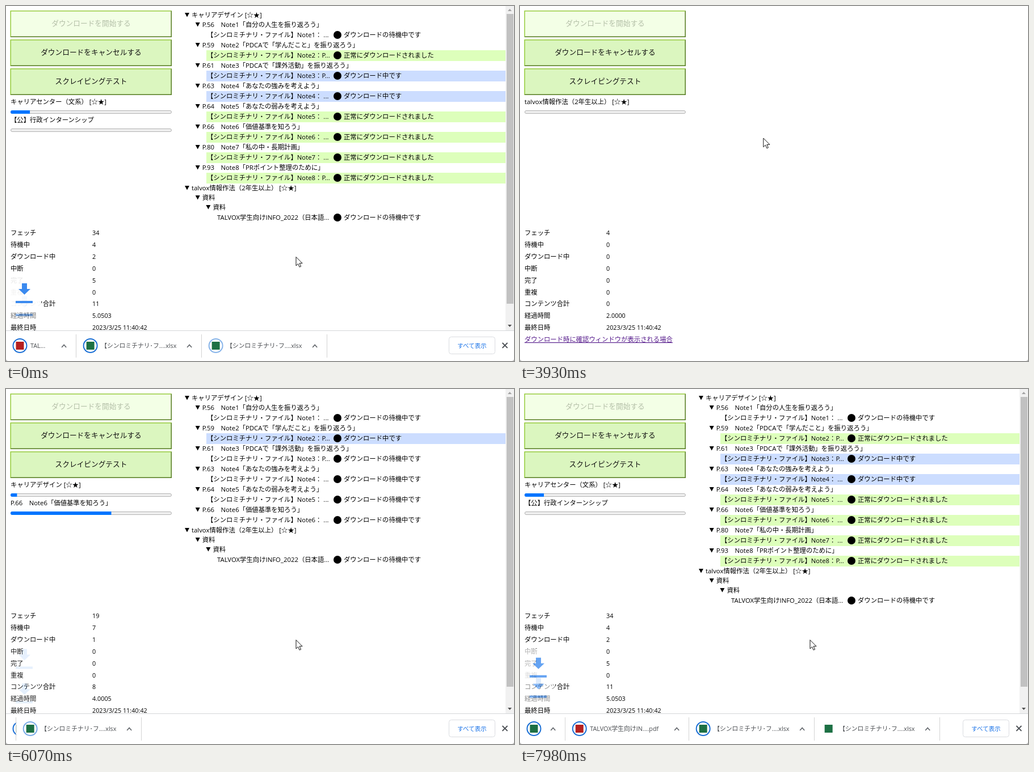
Write an HTML page that moves like this. It is 895x626 px and loops after 8000 ms.

```html
<!DOCTYPE html>
<html lang="ja">
<head>
<meta charset="utf-8">
<title>ダウンロード</title>
<style>
html, body { margin: 0; width: 100%; height: 100%; overflow: hidden; background: #fff; }
svg { display: block; font: 400 11.35px "Open Sans", "Noto Sans CJK JP", "Noto Sans CJK", sans-serif; }
</style>
</head>
<body>
<svg id="stage" width="895" height="626" viewBox="0 0 895 626"></svg>
<script>
const LOOP = 8000, stage = document.getElementById('stage');
const COURSE = 'talvox情報作法（2年生以上） [☆★]', CAREER = 'キャリアデザイン [☆★]';

// page, title, download start, download end
const notes = [
  [56, '自分の人生を振り返ろう'],
  [59, 'PDCAで「学んだこと」を振り返ろう', 5240, 6400],
  [61, 'PDCAで「課外活動」を振り返ろう', 7400],
  [63, 'あなたの強みを考えよう', 7520],
  [64, 'あなたの弱みを考えよう', 6300, 6700],
  [66, '価値基準を知ろう', 6500, 7100],
  [80, '私の中・長期計画', 7000, 7300],
  [93, 'PRポイント整理のために', 7150, 7450]
];
const noteName = i => `P.${notes[i][0]}　Note${i + 1}「${notes[i][1]}」`;
const noteTimes = [4560, 4830, 5200, 5340, 5660, 5930, 6200, 6400];

const courses = [[3510, COURSE, 0], [4480, CAREER, 1 / 25],
  [6500, 'キャリアセンター（理工）全学年対象', 2 / 25], [7150, 'キャリアセンター（文系） [☆★]', 3 / 25]];
const pages = [[4210, '資料', 0],
  ...[4480, 4970, 5500, 5640, 5800, 5980, 6200, 6340].map((t, i) => [t, noteName(i), i / 8]),
  [6500, 'トップページ', 0], [7150, '【公】行政インターンシップ', 0]];

const labels = ['フェッチ', '待機中', 'ダウンロード中', '中断', '完了', '重複', 'コンテンツ合計', '経過時間', '最終日時'];
// time, then one value per label
const counts = ['2430 0 0 0 0 0 0 0 0.0000', '2890 0 0 0 0 0 0 0 1.0000', '3510 2 0 0 0 0 0 0 1.0000',
  '3790 4 0 0 0 0 0 0 2.0000', '4280 6 1 0 0 0 0 1 2.0000', '4560 8 1 0 0 0 0 1 3.0000',
  '4830 10 2 0 0 0 0 2 3.0000', '5340 14 3 0 0 0 0 3 3.0002', '5600 16 5 0 0 0 0 5 3.0003',
  '5860 17 6 0 0 0 0 6 4.0003', '6040 19 7 1 0 0 0 8 4.0005', '6400 21 8 1 0 1 0 10 4.0202',
  '6760 24 7 1 0 2 0 10 4.0501', '7170 28 6 2 0 3 0 11 4.0502', '7500 34 4 2 0 5 0 11 5.0503'
].map(s => s.split(' '));

// shelf items: start, delay before the ring pulses, is PDF
const files = [[5279, 580], [6050, 305], [6340, 280], [6753, 752], [7150, 850], [7540, 900, true], [7880, 900]];
const oldFiles = [[-900, 670], [-500, 900], [-168, 900, true]];
// arrows rising from the shelf; the first leaves from lower down while the shelf opens
const flights = [[5270, 536], ...[5490, 6050, 6340, 6725, 7150, 7540, 7870].map(t => [t, 521.5])];
const oldFlights = [[-300, 521.5], [-90, 521.5]];

const clamp = v => Math.max(0, Math.min(1, v));
const part = (t, a, b) => clamp((t - a) / (b - a));
const mix = (a, b, p) => a + (b - a) * p;
const last = (list, t) => list.filter(e => e[0] <= t).pop();
const rect = (x, y, w, h, fill, more = '') =>
  `<rect x="${x}" y="${y}" width="${w}" height="${h}" fill="${fill}" ${more}/>`;
const path = (d, fill, more = '') => `<path d="${d}" fill="${fill}" ${more}/>`;
const text = (x, mid, s, more = '') => `<text x="${x}" y="${mid + 4}" ${more}>${s}</text>`;

function button(y, label, fill, ink) {
  return rect(7.5, y, 284.5, 47, fill) +
    path(`M7.500 ${y + 47}V${y}H292l-1.500 1.500H9V${y + 45.5}z`, '#98cb40') +
    path(`M7.500 ${y + 47}H292V${y}l-1.500 1.500V${y + 45.5}H9z`, '#557a20') +
    text(150, y + 23, label, `text-anchor="middle" font-size="12.7" fill="${ink}"`);
}

function progress(mid, [, name, value]) {
  const w = 284 * value;
  return text(8, mid, name) +
    rect(8.5, mid + 15.5, 283, 5, '#efefef', 'rx="2.5" stroke="#b2b2b2"') +
    (w ? path(`M${8 + w} ${mid + 15}H11a3 3 0 0 0 0 6H${8 + w}z`, '#0075ff') : '');
}

function panel(t) {
  const off = t >= 1840, hover = t >= 1230;
  let s = button(8, 'ダウンロードを開始する', off ? '#f3ffe6' : hover ? '#d0f2ae' : '#dbf6bf', off ? '#b4bfa8' : '#111') +
    button(59, 'ダウンロードをキャンセルする', '#dbf6bf', '#111') +
    button(110, 'スクレイピングテスト', '#dbf6bf', '#111');
  const course = last(courses, t), page = last(pages, t), row = last(counts, t) || [];
  if (course) s += progress(169, course);
  if (page) s += progress(201, page);
  labels.forEach((name, i) => {
    const y = 400 + 20.9 * i, value = i == 8 ? '2023/3/25 11:40:42' : row[i + 1];
    s += text(8, y, name) + (value ? text(152, y, value, 'font-size="10.8"') : '');
  });
  return s + text(8, 588, 'ダウンロード時に確認ウィンドウが表示される場合', 'fill="#551a8b" text-decoration="underline"');
}

function tree(t, shift) {
  const branch = (level, y, name) => {
    const x = 315 + 18.7 * level;
    return path(`M${x} ${y - 4}h8l-4 7.5z`, '#000') + text(x + 12, y, name);
  };
  const leaf = (x, y, name, state) =>
    (state ? rect(353, y - 9, 527 + shift, 19, state > 1 ? '#dfb' : '#cdf') : '') + text(x, y, name) +
    `<circle cx="${584 + shift}" cy="${y}" r="7"/>` +
    text(595 + shift, y, ['ダウンロードの待機中です', 'ダウンロード中です', '正常にダウンロードされました'][state]);
  if (t < 4280) return '';
  const n = noteTimes.filter(v => v <= t).length;
  let s = n ? branch(0, 16, CAREER) : '';
  for (let i = 0; i < n; i++) {
    const [, , start, end] = notes[i], tail = [1, 2, 7].includes(i) ? 'P...' : ' ...';
    s += branch(1, 33 + 36 * i, noteName(i)) +
      leaf(354, 51 + 36 * i, `【シンロミチナリ・ファイル】Note${i + 1}：${tail}`, (t >= start) + (t >= end));
  }
  const y = n ? 33 + 36 * n : 16;
  return s + branch(0, y, COURSE) + branch(1, y + 17, '資料') + branch(2, y + 34, '資料') +
    leaf(372, y + 52, 'TALVOX学生向けINFO_2022（日本語...', 0);
}

function flight(t, [start, from]) {
  const v = (t - start) / 600, y = from - 65 * v;
  if (v < 0 || v > 1) return '';
  return `<g opacity="${1 - 4 * (v - .5) ** 2}">` + rect(2, y - 16, 60, 62, '#fff', 'rx="8" opacity=".9"') +
    path(`M28 ${y}h9v10h6l-10.500 10l-10.500-10h6z M17 ${y + 31}h30v4h-30z`, '#3b8aef') + '</g>';
}

function fit(name, room) {
  const size = c => c < '\u0100' ? 7 : 10.8;
  if (room > 125) return name;
  let cut = '', w = 9;
  for (const c of name) {
    if ((w += size(c)) > room) break;
    cut += c;
  }
  return cut && cut + '...';
}

function fileItem(x, w, age, delay, pdf) {
  const ring = .5 + .5 * Math.cos(2 * Math.PI * Math.max(0, age - delay) / 950);
  const name = pdf ? 'TALVOX学生向けIN....pdf' : '【シンロミチナリ･フ....xlsx';
  const chevron = w - 22;
  return `<svg x="${x}" y="573" width="${w}" height="53">` +
    `<circle cx="24.500" cy="26" r="12" fill="#fff" stroke="#1a6fd6" stroke-width="2" stroke-opacity="${ring}"/>` +
    rect(17.5, 19, 14, 14, pdf ? '#b5201f' : '#1d7044') +
    text(43, 26, fit(name, w - 88), 'font-size="10.8" fill="#4a4d51"') +
    (w > 45 ? path(`M${chevron - 4} 29l4-4.500l4 4.500`, 'none', 'stroke="#5f6368" stroke-width="1.600"') : '') +
    rect(w - 1, 6, 1, 41, '#ccc') + '</svg>';
}

function shelf(t, list, drop) {
  let s = rect(0, 572, 895, 54, '#fff') + rect(0, 572, 895, 1, '#d4d6d9'), x = 0;
  for (const [start, delay, pdf] of [...list].reverse()) {
    const age = t - start;
    if (age <= 0) continue;
    const w = 221 * (1 - (1 - clamp(age / 500)) ** 2);
    if (x + w > 770) break;
    s += fileItem(x, w, age, delay, pdf);
    x += w;
  }
  s += rect(780.5, 583.5, 81, 30, '#fff', 'rx="4" stroke="#dadce0"') +
    text(821, 599, 'すべて表示', 'text-anchor="middle" font-size="10.5" fill="#1a73e8"') +
    path('M874.500 594l9 9m0-9l-9 9', 'none', 'stroke="#4d5156" stroke-width="1.800"');
  return `<g transform="translate(0 ${drop})">${s}</g>`;
}

const scrollbar = bottom => rect(880, 0, 15, bottom, '#f1f1f1') + rect(882, 14, 12, 511, '#c1c1c1') +
  path('M884 9l3.500-4l3.500 4z', '#a3a3a3') + path(`M884 ${bottom - 10}h7l-3.500 4z`, '#505050');

function cursor(t) {
  let x, y;
  if (t < 3440) {
    const p = part(t, 530, 1300), q = part(t, 1300, 1510), e = p * p * (3 - 2 * p);
    x = mix(mix(820, 238, e), 228, q);
    y = mix(mix(567, 41, e), 27, q);
  } else {
    const rest = 1 - part(t, 3440, 4640);
    x = mix(511, 228, rest ** 2.35);
    y = mix(442, 27, rest ** 1.3);
  }
  const busy = t > 6740 && t < 7050
    ? '<circle cx="525" cy="442" r="5.500" fill="#fff" stroke="#2b90e6" stroke-width="4"/>' : '';
  return busy + path('M0 .5v15.500l3.600-3.400l2.500 5.700l2.500-1.100l-2.500-5.500h5z', '#fff',
    `stroke="#111" transform="translate(${x} ${y})"`);
}

function draw(now) {
  const t = Math.max(0, now - begin) % LOOP, tail = t < 70, T = tail ? LOOP - 1 : t;
  const drop = 54 * (1 - part(T, 5170, 5290)), open = T >= 5170;
  stage.innerHTML = panel(T) + tree(T, open ? 0 : 16) +
    [...(tail ? oldFlights : flights)].reverse().map(f => flight(t, f)).join('') +
    (open ? scrollbar(572 + drop) + shelf(t, tail ? oldFiles : files, drop) : '') +
    path('M0 622v4h4a4 4 0 0 1-4-4M895 622v4h-4a4 4 0 0 0 4-4', '#aaa') + cursor(T);
  requestAnimationFrame(draw);
}
const begin = performance.now();
draw(begin);
</script>
</body>
</html>
```
